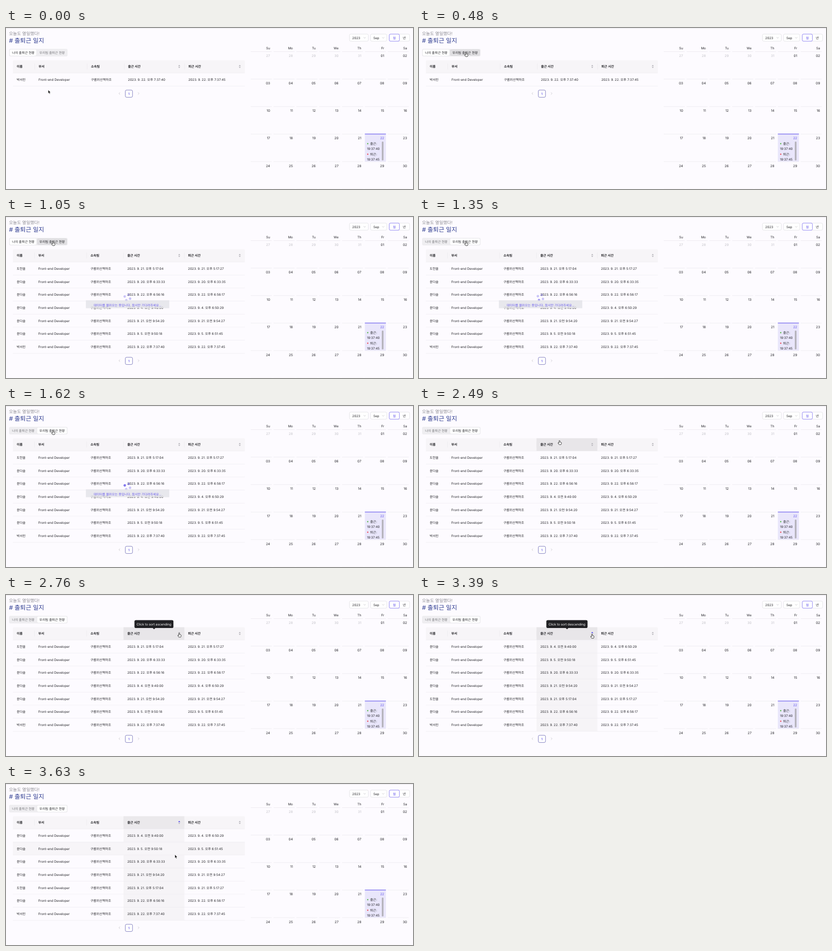
Animation, 800 px wide and 317 px high, one loop 3660 ms. Source, as an HTML page:

```html
<!DOCTYPE html>
<html lang="ko">
<head>
<meta charset="utf-8">
<title>출퇴근 일지</title>
<style>
  html, body { margin: 0; width: 100%; height: 100%; overflow: hidden; background: #fdfbff; }
  svg { display: block; width: 800px; height: 317px; }
  text {
    font-family: Inter, 'Noto Sans CJK KR', 'Noto Sans CJK', sans-serif;
    text-rendering: geometricPrecision;
    white-space: pre;
  }
</style>
</head>
<body>
<svg id="stage" viewBox="0 0 800 317" xmlns="http://www.w3.org/2000/svg"></svg>
<script>
const LOOP = 3660, TICK = 30;
const INK = '#252529', MUTED = '#77777c', VIOLET = '#6557ec', LINE = '#ebe9ee';

// ---------- drawing helpers ----------
const attrs = o => Object.entries(o).map(([k, v]) => ` ${k}="${v}"`).join('');
const group = (body, o = {}) => `<g${attrs(o)}>${body}</g>`;
const rect = (x, y, w, h, fill, o = {}) =>
  `<rect x="${x}" y="${y}" width="${w}" height="${h}" fill="${fill}"${attrs(o)}/>`;
const path = (d, o) => `<path d="${d}"${attrs(o)}/>`;
const dot = (x, y, r, fill, o = {}) => `<circle cx="${x}" cy="${y}" r="${r}" fill="${fill}"${attrs(o)}/>`;
// y is the vertical middle of the line
const text = (x, y, s, { size = 6.3, fill = INK, ...o } = {}) =>
  `<text x="${x}" y="${(y + size * .365).toFixed(2)}" font-size="${size}" fill="${fill}"${attrs(o)}>${s}</text>`;
const chevron = (x, y, dx, dy, color) =>
  path(dx ? `M${x - dx} ${y - 2.2}L${x + dx} ${y}L${x - dx} ${y + 2.2}` : `M${x - 2.2} ${y - dy}L${x} ${y + dy}L${x + 2.2} ${y - dy}`,
    { fill: 'none', stroke: color, 'stroke-width': .7 });

// ---------- table ----------
const TOP = 63.5, HEAD = 25, PITCH = 25.68, BODY = TOP + HEAD;
const TEAM = '구름위산책하조';
const ROWS = [
  ['도한울', '21. 오후 5:17:04', '21. 오후 5:17:27'],
  ['윤다솔', '20. 오후 6:33:33', '20. 오후 6:33:35'],
  ['윤다솔', '22. 오후 6:56:16', '22. 오후 6:56:17'],
  ['윤다솔', '4. 오전 9:40:00', '4. 오후 6:50:29'],
  ['윤다솔', '21. 오전 9:54:20', '21. 오전 9:54:27'],
  ['윤다솔', '5. 오전 9:50:18', '5. 오후 6:51:45'],
  ['박서린', '22. 오후 7:37:40', '22. 오후 7:37:45'],
];
const SORTED = [3, 5, 1, 4, 0, 2, 6].map(i => ROWS[i]);

const sorter = (x, up) =>
  path(`M${x - 2} 75L${x} 72.4L${x + 2} 75Z`, { fill: up }) +
  path(`M${x - 2} 76.4L${x} 79L${x + 2} 76.4Z`, { fill: '#b3b2b8' });

function table(id, rows, cols, sorted) {
  let out = '';
  ['이름', '부서', '소속팀', '출근 시간', '퇴근 시간'].forEach((s, i) => {
    out += text(cols[i], 75.8, s, { 'font-weight': 600 });
    if (i) out += rect(cols[i] - 7.8, 70, .6, 11.5, '#e9e7eb');
  });
  out += sorter(340.5, sorted ? '#4a40ee' : '#b3b2b8') + sorter(459.5, '#b3b2b8');
  rows.forEach(([name, start, end], i) => {
    const y = BODY + PITCH * (i + .5) + .4;
    [name, 'Front-end Developer', TEAM, '2023. 9. ' + start, '2023. 9. ' + end]
      .forEach((s, c) => out += text(cols[c], y, s));
    out += rect(13.5, BODY + PITCH * (i + 1) - .3, 456, .6, LINE);
  });
  const py = rows.length > 1 ? 283 : 129;
  out += rect(234.5, py - 6.8, 14.2, 14.2, '#fff', { rx: 2.6, stroke: '#6a67b4', 'stroke-width': .8 }) +
    text(241.6, py + .3, '1', { fill: VIOLET, 'font-weight': 600, 'text-anchor': 'middle' }) +
    chevron(223, py, -1.1, 0, '#bcbbc2') + chevron(260.5, py, 1.1, 0, '#bcbbc2');
  return group(out, { id });
}

// ---------- calendar ----------
function calendar() {
  const end = { 'text-anchor': 'end' };
  const box = (x, w, stroke) => rect(x, 12, w, 14, '#fff', { rx: 2.5, stroke, 'stroke-width': .7 });
  let out = box(675.2, 37, '#dcdbe0') + text(680.6, 19.2, '2023') + chevron(705, 19.2, 0, 1, '#bbbac0') +
    box(716.5, 32, '#dcdbe0') + text(722, 19.2, 'Sep') + chevron(741.5, 19.2, 0, 1, '#bbbac0') +
    box(768, 25.3, '#dcdbe0') + box(753.3, 20, VIOLET) +
    text(763.3, 19.2, '월', { fill: VIOLET, 'text-anchor': 'middle' }) +
    text(783, 19.2, '년', { 'text-anchor': 'middle' });
  const left = c => 481 + c * 44.87;
  out += rect(left(5), 208.2, 41.4, 55, '#e9e6fb');
  ['Su', 'Mo', 'Tu', 'We', 'Th', 'Fr', 'Sa'].forEach((s, c) => out += text(left(c) + 38, 40, s, end));
  for (let i = 0; i < 42; i++) {
    const c = i % 7, row = Math.floor(i / 7), y = 46.3 + row * 54.1;
    const day = i < 5 ? 27 + i : i - 4, today = i === 26;
    out += rect(left(c), today ? y - .4 : y, 41.4, today ? 1.1 : .7, today ? VIOLET : '#e8e6eb');
    if (row < 5) out += text(left(c) + 38, y + 8.5, String(day).padStart(2, '0'),
      { size: 6.5, fill: i < 5 ? '#c2c1c7' : today ? VIOLET : INK, ...end });
  }
  [['출근:', '19:37:40', '#58b947'], ['퇴근:', '19:37:45', '#ef4b55']].forEach(([label, time, color], i) => {
    const y = 227.6 + i * 20.6;
    out += dot(711, y + .2, 1.25, color) + text(715.8, y, label) + text(709.4, y + 10.4, time, { size: 6.2 });
  });
  return out + rect(738.7, 223.5, 3.3, 37.3, '#b5b3bb', { rx: 1.6 });
}

// ---------- floating parts ----------
const DOT_COLOR = '#5546e8';
const spinner = group(
  group([0, 1, 2, 3].map(i => dot(5.7 * Math.cos(i * Math.PI / 2), 5.7 * Math.sin(i * Math.PI / 2), 2.4, DOT_COLOR)).join(''), { id: 'dots' }) +
  rect(157, 164, 164, 15.6, '#e5e4e9', { 'fill-opacity': .82 }) +
  text(239, 174, '데이터를 불러오는 중입니다. 잠시만 기다려주세요...', { size: 6.2, fill: '#6a5cec', 'text-anchor': 'middle' }),
  { id: 'spinner' });

const tooltip = group(
  rect(252.5, 49.5, 76.6, 15.6, '#212124', { id: 'tipBox', rx: 2.8 }) +
  path('M288.4 65L291 67.6L293.6 65Z', { fill: '#212124' }) +
  text(290.8, 57.3, '', { id: 'tipText', fill: '#fff', 'text-anchor': 'middle' }),
  { id: 'tip' });

const cursors =
  path('M0 0V6.8L1.5 5.5L2.6 7.9L3.8 7.4L2.7 5H4.8Z', { id: 'arrow', fill: '#111', stroke: '#fff', 'stroke-width': .5 }) +
  path('M-.9 .8A.9 .9 0 0 1 .9 .8V3L3 3.4Q4.1 3.7 3.9 4.9L3.5 6.6L2.9 8H-.8L-2.9 5Q-3 3.9-2 4.1L-.9 5Z',
    { id: 'hand', fill: '#fff', stroke: '#111', 'stroke-width': .75, 'stroke-linejoin': 'round' });

document.getElementById('stage').innerHTML =
  rect(0, 0, 800, 317, '#fdfbff') + rect(0, 0, 800, .8, '#e6e5e8') +
  text(6, 11.2, '오늘도 열일했다!', { size: 8.5, fill: '#8b8a90' }) +
  text(6, 24.6, '# 출퇴근 일지', { size: 11.9, fill: '#2c3a8f' }) +
  rect(6, 41, 115, 15, '#efeef1', { rx: 3 }) +
  rect(61, 42, 59, 13, '#e0dfe2', { id: 'tabHover', rx: 2.4 }) +
  rect(7, 42, 53, 13, '#fff', { id: 'thumb', rx: 2.4, stroke: '#e2e1e5', 'stroke-width': .5 }) +
  text(12, 48.3, '나의 출퇴근 현황', { id: 'tabMine' }) +
  text(65.6, 48.3, '우리팀 출퇴근 현황', { id: 'tabTeam' }) +
  rect(13.5, TOP, 456, HEAD, '#f7f5f8', { rx: 2 }) +
  rect(231, BODY, 119.5, PITCH * 7, '#f6f4f7', { id: 'colBody' }) +
  rect(13.5, BODY, 456, PITCH, '#f7f5f8', { id: 'rowHover' }) +
  rect(231, TOP, 119.5, HEAD, '', { id: 'colHead' }) +
  rect(13.5, BODY - .3, 456, .6, LINE) +
  table('mine', ROWS.slice(6), [21, 64, 167, 239.8, 358.5]) +
  table('team', ROWS, [21, 63.5, 166, 238.5, 357.8]) +
  table('sorted', SORTED, [21, 63.5, 166, 238.5, 357.8], true) +
  calendar() + spinner + tooltip + group(cursors, { id: 'cursor' });

// ---------- motion ----------
const $ = Object.fromEntries([...document.querySelectorAll('[id]')].map(e => [e.id, e]));
const set = (el, o) => { for (const k in o) el.setAttribute(k, o[k]); };
const show = (el, on) => set(el, { display: on ? 'inline' : 'none' });
const clamp = v => Math.max(0, Math.min(1, v));
const span = (t, a, b) => clamp((t - a) / (b - a));
const ease = p => p * p * (3 - 2 * p);
const mix = (a, b, p) => a + (b - a) * p;

const SWITCH = 1020, LOADED = 1890, SORT = 3000;
const MOVES = [ // from, to, x, y
  [0, 0, 83, 122],
  [30, 420, 92.4, 48.3],
  [2190, 2640, 340.5, 75],
  [3360, 3630, 332, 139],
];

function pointer(t) {
  let [, , x, y] = MOVES[0];
  for (const [a, b, tx, ty] of MOVES.slice(1)) {
    const p = ease(span(t, a, b));
    x = mix(x, tx, p);
    y = mix(y, ty, p);
  }
  return [x, y];
}

function draw(t) {
  const [x, y] = pointer(t);
  const team = t >= SWITCH, sorted = t >= SORT;
  const onTab = x > 61 && x < 120 && y > 41 && y < 56;
  const onHead = x > 231 && x < 350 && y > TOP && y < BODY;

  const slide = ease(span(t, 1050, 1350));
  set($.thumb, { x: mix(7, 61, slide), width: mix(53, 59, slide) });
  show($.tabHover, onTab && slide < 1);
  set($.tabMine, { fill: slide > 0 ? MUTED : INK });
  set($.tabTeam, { fill: slide > 0 || onTab ? INK : MUTED });

  show($.mine, !team);
  show($.team, team && !sorted);
  show($.sorted, sorted);
  show($.colHead, onHead || sorted);
  set($.colHead, { fill: onHead ? '#e8e6e9' : '#ebe9ec' });
  show($.colBody, sorted);
  const row = Math.floor((y - BODY) / PITCH);
  show($.rowHover, row >= 0 && row < (team ? 7 : 1));
  set($.rowHover, { y: BODY + PITCH * Math.max(row, 0) });

  show($.spinner, team && t < LOADED);
  const turn = 22 + (t - 1050) * .32;
  set($.dots, { transform: `translate(238.6 158.6) rotate(${turn})` });
  [...$.dots.children].forEach((d, i) => {
    const phase = Math.max(0, (t - SWITCH) / 1000 - i * .4) % 2;
    set(d, { opacity: .3 + .7 * (phase > 1 ? 2 - phase : phase) });
  });

  const tip = Math.min(span(t, 2700, 2760), 1 - span(t, 3450, 3570));
  set($.tip, { opacity: tip });
  $.tipText.textContent = sorted ? 'Click to sort descending' : 'Click to sort ascending';
  set($.tipBox, sorted ? { x: 250.3, width: 81 } : { x: 252.5, width: 76.6 });

  set($.cursor, { transform: `translate(${x} ${y})` });
  show($.hand, onTab || onHead);
  show($.arrow, !onTab && !onHead);
}

const born = performance.now();
function loop() {
  const t = (performance.now() - born) % LOOP;
  draw(Math.floor(t / TICK) * TICK);
  requestAnimationFrame(loop);
}
loop();
</script>
</body>
</html>
```
